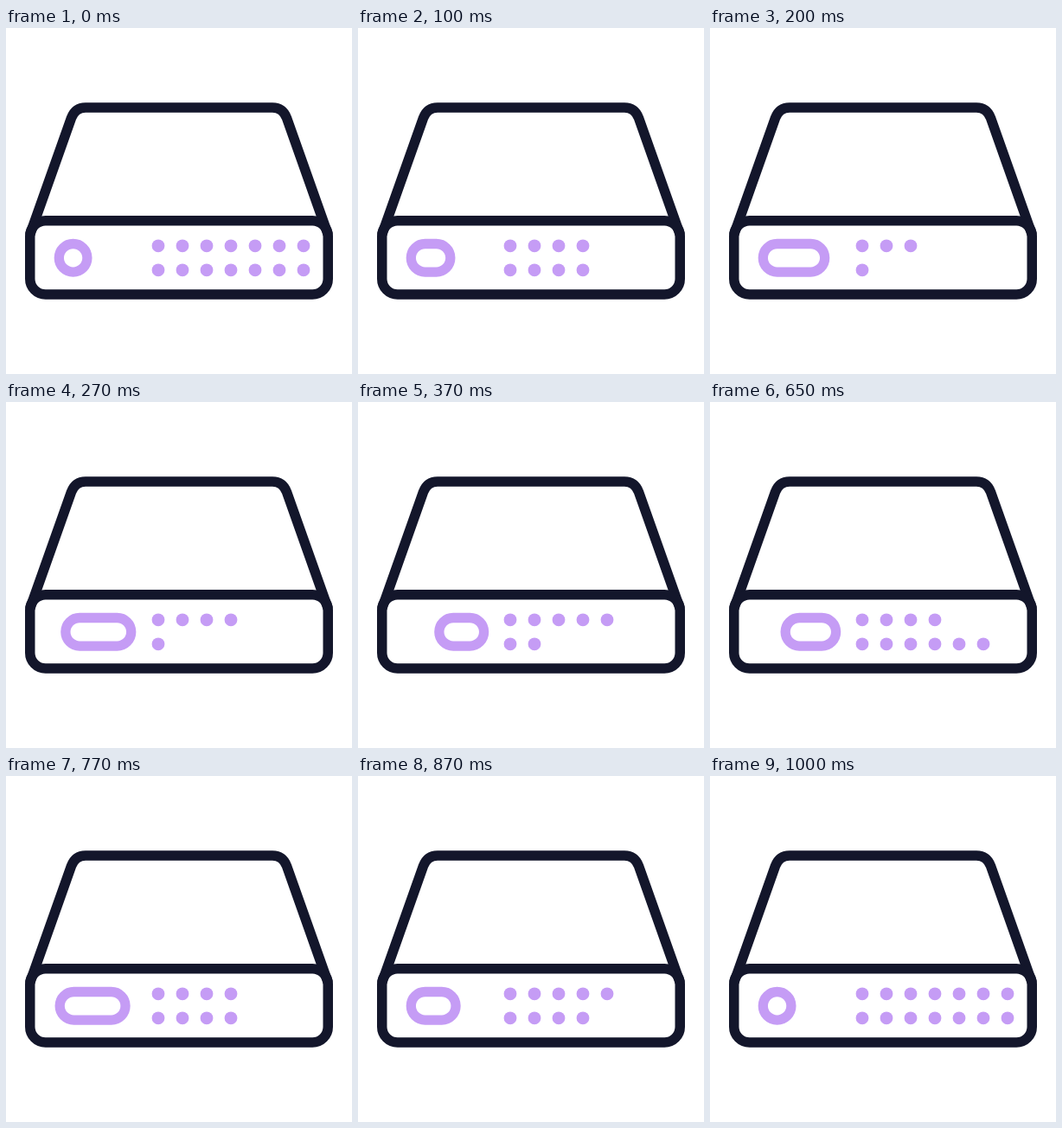
Recreate the animation shown at these times as an HTML page. Size 400x400 px, loop 1.02 s.

```html
<!DOCTYPE html>
<html lang="en">
<head>
<meta charset="utf-8">
<title>Network switch</title>
<style>
  html, body { margin: 0; width: 100%; height: 100%; overflow: hidden; background: #fff; }
  svg { display: block; width: 100%; height: 100%; }
  .case { fill: none; stroke: #13162b; stroke-width: 11.5; stroke-linecap: round; }
  .knob { fill: none; stroke: #c59cf5; stroke-width: 11.3; }
  .light { fill: #c59cf5; }
</style>
</head>
<body>
<svg viewBox="0 0 400 400">
  <path class="case" d="M28 238 L75.5 104 Q80 92 92 92 H308 Q320 92 324.5 104 L372 238"/>
  <rect class="case" x="27.75" y="222.75" width="344.5" height="85.25" rx="18"/>
  <rect class="knob" id="knob" y="249.5" height="32.6" rx="16.3"/>
  <g id="lights"></g>
</svg>
<script>
const LOOP = 1020;
const STEP = 25;
const TRAVEL = 51.7;
const COLUMNS = 7;

// Keyframes are [time in ms, value] pairs.
const knobLeft = [[200, 0], [500, TRAVEL], [800, 0]];
const knobRight = [[0, 0], [300, TRAVEL], [700, TRAVEL], [1000, 0]];
const rows = [
  { y: 251.8, keys: [[0, 6], [150, 2], [500, 6], [700, 3], [1000, 6]] },
  { y: 279.8, keys: [[0, 6], [250, 0], [600, 6], [800, 3], [1000, 6]] }
];

const knob = document.getElementById("knob");
const lights = document.getElementById("lights");

const ease = p => (1 - Math.cos(Math.PI * p)) / 2;

function valueAt(keys, t) {
  if (t <= keys[0][0]) return keys[0][1];
  for (let i = 1; i < keys.length; i++) {
    const [t0, a] = keys[i - 1];
    const [t1, b] = keys[i];
    if (t < t1) return a + (b - a) * ease((t - t0) / (t1 - t0));
  }
  return keys[keys.length - 1][1];
}

function makeLight(x, y) {
  const dot = document.createElementNS("http://www.w3.org/2000/svg", "circle");
  dot.setAttribute("class", "light");
  dot.setAttribute("cx", x);
  dot.setAttribute("cy", y);
  dot.setAttribute("r", 7.4);
  return lights.appendChild(dot);
}

for (const row of rows) {
  row.dots = Array.from({ length: COLUMNS }, (_, i) => makeLight(176 + 28 * i, row.y));
}

// Steps alternate between 20 and 30 ms on screen.
function steppedTime(ms) {
  const t = ms % LOOP;
  return STEP * (2 * Math.floor(t / 50) + (t % 50 >= 20 ? 1 : 0));
}

function draw(ms) {
  const t = steppedTime(ms);
  const left = valueAt(knobLeft, t);
  const right = valueAt(knobRight, t);
  knob.setAttribute("x", 61.3 + left);
  knob.setAttribute("width", 32.6 + right - left);
  for (const { keys, dots } of rows) {
    const last = valueAt(keys, t) + 1e-6;
    dots.forEach((dot, i) => dot.setAttribute("visibility", i <= last ? "visible" : "hidden"));
  }
}

const start = performance.now();
function tick() {
  draw(performance.now() - start);
  requestAnimationFrame(tick);
}
tick();
</script>
</body>
</html>
```
